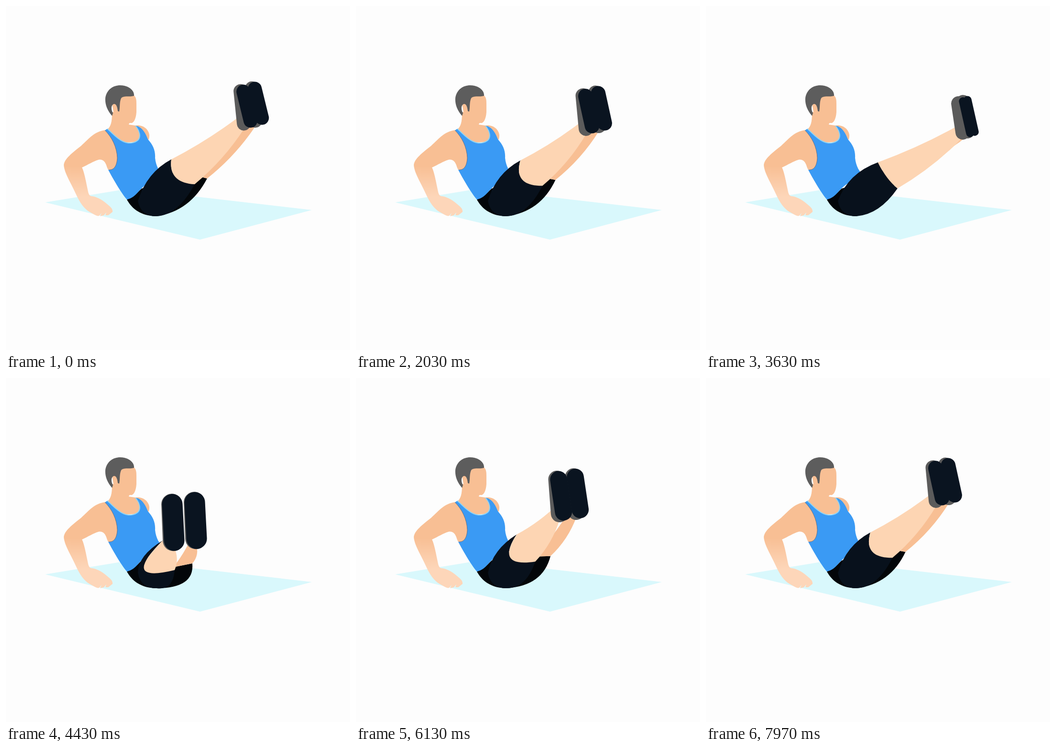
These frames come from a looping animation (720 by 720 pixels, 8000 ms). An HTML page:

```html
<!DOCTYPE html>
<html lang="en">
<head>
<meta charset="utf-8">
<title>Leg circle exercise</title>
<style>
html, body { margin: 0; width: 100%; height: 100%; overflow: hidden; background: #fdfdfd; }
svg { display: block; width: 100vw; height: 100vh; }
.skin { fill: #f8bf94; }
.paleSkin { fill: #fdd5b3; }
.shorts { fill: #08111c; }
.farShorts { fill: #030609; }
.shoe, .sole { fill: none; stroke: #5b5b5b; stroke-linecap: round; }
.sole { stroke: #0a1420; }
</style>
</head>
<body>
<svg viewBox="0 0 720 720">
  <defs>
    <linearGradient id="armSkin" gradientUnits="userSpaceOnUse" x1="0" y1="335" x2="0" y2="400">
      <stop offset="0" stop-color="#f8bf94"/>
      <stop offset="1" stop-color="#fdd6b9"/>
    </linearGradient>
  </defs>
  <path fill="#d9f8fc" d="M82 411L256 382.5L640 427L406 489Z"/>
  <g class="skin">
    <path d="M266 251C284 246 298 256 300 270C300 277 299 279 297 281L280 285Z"/>
    <path d="M222 222C222 238 221 252 212 258L244 286L276 284L282 262L270 250L256 248L262 220Z"/>
    <path d="M222 205L240 187L268 187C273 192 273 198 273 206L273 222C272 237 267 245 262 245C259 244 257 245 257 249L230 250Z"/>
  </g>
  <path fill="#5d5d5d" d="M222 230C210 216 207 203 208 192C211 175 224 166 239 166C256 166 269 176 268 188C257 191 246 187 241 193C237 202 239 212 237 221L234 220C233 211 231 205 226 205C219 207 220 219 224 224Z"/>
  <path fill="#3a9af4" d="M212 257C224 267 232 278 246 284C257 289 269 287 276 281C283 274 280 261 271 251C282 251 291 263 297 279C308 291 313 303 312 318C314 336 321 347 331 356C300 366 285 378 275 392C268 400 260 405 253 405C240 390 222 358 214 343L206 261Z"/>
  <path fill="none" stroke="#8bd3f6" stroke-width="2" d="M212 257C224 267 232 278 246 284C257 289 269 287 276 281C283 274 280 261 271 251"/>
  <path fill="url(#armSkin)" d="M207 260C186 262 173 278 158 292C138 308 122 320 121 333C122 350 137 372 147 395C155 412 163 424 175 431C186 437 193 442 196 438L200 433L197 440L205 438L210 432L208 438L214 438L223 431C224 424 217 419 211 414C200 404 186 398 178 398C172 396 172 388 170 380C167 365 163 345 159 338C172 332 183 325 193 322C203 320 207 326 210 333C212 340 214 344 217 343C226 343 232 335 233 318C232 295 222 275 207 260Z"/>
  <path fill="none" stroke="#6b7080" d="M207 260C222 275 232 295 233 318C232 335 226 343 216 343"/>
  <path class="farShorts" d="M253 405C268 402 274 391 284 382L310 375L315 440C290 440 266 430 253 405Z"/>
  <path id="farShorts" class="farShorts"/>
  <path id="farLeg" class="skin"/>
  <path id="farShoe" class="shoe"/>
  <path id="farSole" class="sole"/>
  <path id="nearShorts" class="shorts"/>
  <path id="nearLeg" class="paleSkin"/>
  <path id="nearShoe" class="shoe"/>
  <path id="nearSole" class="sole"/>
</svg>
<script>
const LOOP = 8000, CYCLE = 1980, CYCLE_START = 2030;

// near, far: hem top, hem bottom, thigh curve, seat curve (near also: hem curve).
// foot: sole toe and heel, shoe toe and heel, both widths, offset of the far foot.
const up = {
  near: [346, 321, 395, 373, 295, 348, 360, 438, 340, 370],
  far: [398, 355, 421, 361, 350, 335, 385, 430],
  foot: [497, 179, 512, 240, 491, 178, 498, 246, 29, 29, 24, -6],
};
const tuck = {
  near: [328, 340, 353, 402, 276, 372, 350, 445, 238, 430],
  far: [350, 396, 390, 388, 330, 375, 395, 440],
  foot: [348, 264, 352, 340, 347, 264, 350, 340, 43, 44, 47, -4],
};
const low = {
  near: [374, 390, 380, 445, 285, 362, 345, 449, 333, 418],
  far: [411, 382, 392, 394, 335, 345, 350, 415],
  foot: [519, 383, 520, 450, 511, 382, 508, 449, 30, 30, 29, -8],
};
const level = {
  near: [375, 347, 397, 407, 295, 358, 362, 438, 396, 373],
  far: [378, 346, 385, 354, 340, 348, 355, 410],
  foot: [555, 266, 566, 343, 543, 277, 552, 331, 6, 35, 0, 1],
};

const mix = (a, b, amount) => a.map((v, i) => v + amount * (b[i] - v));
const mixPose = (a, b, amount) => ({
  near: mix(a.near, b.near, amount),
  far: mix(a.far, b.far, amount),
  foot: mix(a.foot, b.foot, amount),
});

const keys = [
  { time: 0, pose: mixPose(up, tuck, 0.11) },
  { time: 420, pose: tuck },
  { time: 840, pose: low },
  { time: 1320, pose: level },
  { time: 1850, pose: mixPose(up, tuck, -0.07) },
  { time: 1930, pose: up },
];

function keyAt(index) {
  const n = keys.length, turn = Math.floor(index / n), key = keys[index - turn * n];
  return { time: key.time + turn * CYCLE, pose: key.pose };
}

// Smooth cyclic interpolation through unevenly spaced keys.
function valuesAt(phase, part) {
  const index = keys.findLastIndex(key => key.time <= phase);
  const [a, b, c, d] = [-1, 0, 1, 2].map(step => keyAt(index + step));
  const before = b.time - a.time, span = c.time - b.time, after = d.time - c.time;
  const u = (phase - b.time) / span, v = 1 - u;
  return b.pose[part].map((p, i) => {
    const q = c.pose[part][i], slope = q - p;
    const slopeA = (p - a.pose[part][i]) / before * span;
    const slopeD = (d.pose[part][i] - q) / after * span;
    const slopeIn = (slopeA * span + slope * before) / (before + span);
    const slopeOut = (slope * after + slopeD * span) / (span + after);
    return p * v * v * (1 + 2 * u) + q * u * u * (3 - 2 * u)
      + u * v * (slopeIn * v - slopeOut * u);
  });
}

const pairs = values => Array.from({ length: values.length / 2 }, (_, i) => values.slice(2 * i, 2 * i + 2));
const setPath = (id, d) => document.getElementById(id).setAttribute('d', d);

// Control point beside the middle of a line.
function bow([x1, y1], [x2, y2], size) {
  const scale = size / Math.hypot(x2 - x1, y2 - y1);
  return [(x1 + x2) / 2 - (y2 - y1) * scale, (y1 + y2) / 2 + (x2 - x1) * scale];
}

function drawLeg(side, values, waist, toe, heel) {
  const [top, bottom, thigh, seat, hem = mix(top, bottom, 0.5)] = pairs(values);
  const back = mix(heel, toe, -0.15), front = mix(heel, toe, 0.3);
  setPath(side + 'Shorts', `M${waist}Q${thigh} ${top}Q${hem} ${bottom}Q${seat} 315 440Q282 440 276 408Z`);
  setPath(side + 'Leg', `M${top}Q${hem} ${bottom}Q${bow(bottom, back, 12)} ${back}L${front}Q${bow(top, front, 8)} ${top}Z`);
}

function drawCapsule(id, from, to, width) {
  setPath(id, `M${from}L${to}`);
  document.getElementById(id).setAttribute('stroke-width', width);
}

const start = performance.now();
function draw() {
  const time = (performance.now() - start) % LOOP;
  const phase = (time - CYCLE_START + 2 * CYCLE) % CYCLE;
  const foot = valuesAt(phase, 'foot');
  const [soleWidth, shoeWidth, dx, dy] = foot.slice(8);
  for (const side of ['far', 'near']) {
    const far = side === 'far';
    const [soleToe, soleHeel, shoeToe, shoeHeel] = pairs(foot.slice(0, 8))
      .map(([x, y]) => far ? [x + dx, y + dy] : [x, y]);
    drawLeg(side, valuesAt(phase, side), far ? [300, 372] : [276, 408], shoeToe, shoeHeel);
    drawCapsule(side + 'Shoe', shoeToe, shoeHeel, shoeWidth);
    drawCapsule(side + 'Sole', soleToe, soleHeel, soleWidth);
  }
  requestAnimationFrame(draw);
}
draw();
</script>
</body>
</html>
```
